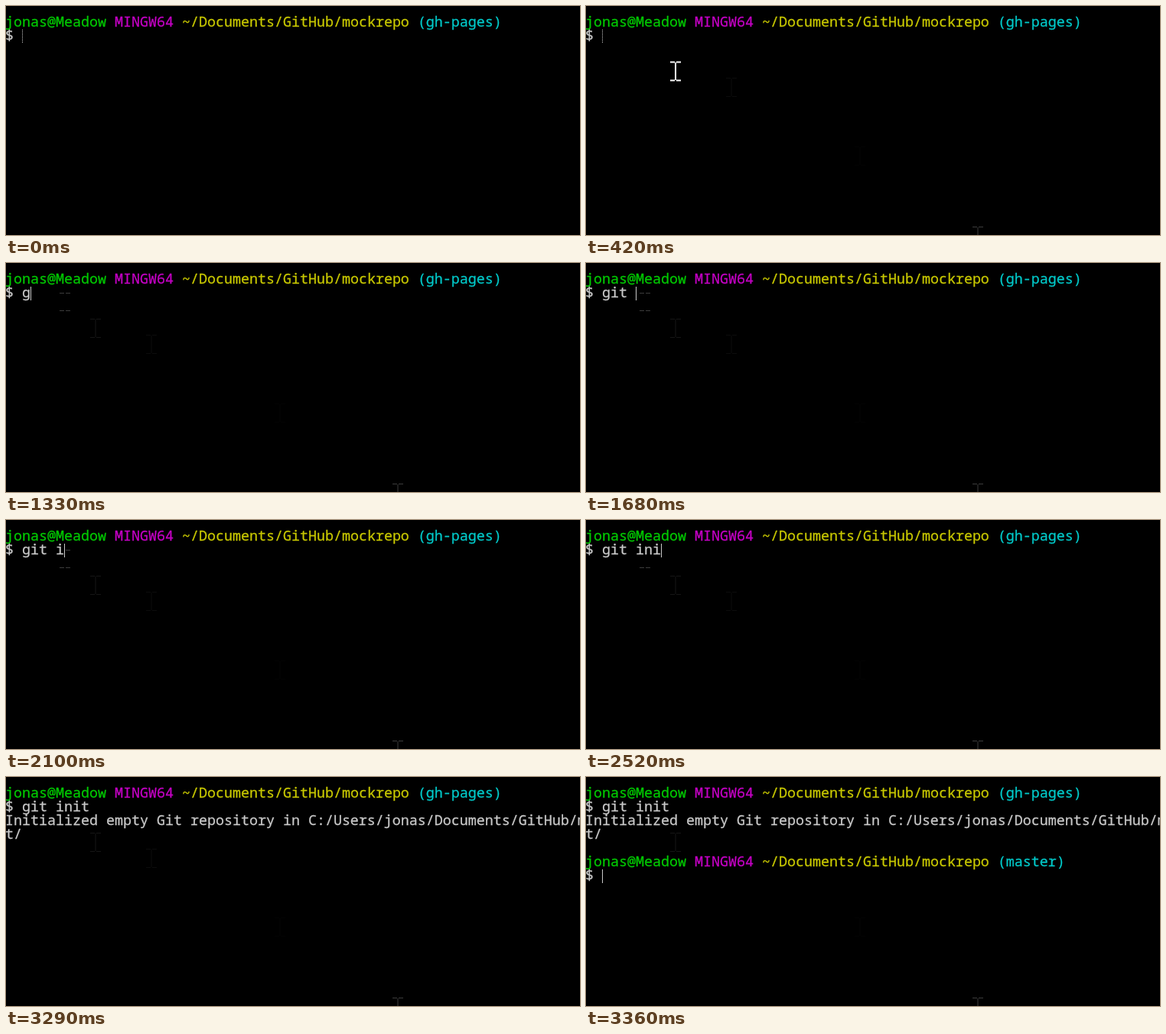
These frames come from a looping animation (750x300 px, 3.71 s). An HTML page:

```html
<!DOCTYPE html>
<html lang="en">
<head>
<meta charset="utf-8">
<title>git init in a terminal</title>
<style>
  html, body { margin: 0; width: 100%; height: 100%; overflow: hidden; background: #000; }
  svg { display: block; width: 750px; height: 300px; }
  text {
    font: 18.333px "Noto Sans Mono", "DejaVu Sans Mono", monospace;
    color: #c8c8c8; fill: currentColor; stroke: currentColor; stroke-width: .3px; white-space: pre;
  }
  tspan { fill: currentColor; stroke: currentColor; }
  .user { color: #00c800; }
  .sys { color: #c400c4; }
  .path { color: #c8c800; }
  .branch { color: #00c8c8; }
  #caret { stroke: #c8c8c8; }
</style>
</head>
<body>
<svg viewBox="0 0 750 300">
  <defs>
    <path id="beam" d="M-7 -11.5h6m2 0h6M-7 12.5h6m2 0h6M0 -11v23" fill="none"/>
  </defs>
  <g id="ghosts"></g>
  <path id="restTop" d="M70 39.5h6m2 0h6" stroke="#3c3c3c"/>
  <path id="restBottom" d="M70 62.5h6m2 0h6" stroke="#3c3c3c"/>
  <rect id="cleared" x="21" y="31" height="18"/>
  <g id="lines"></g>
  <path id="caret"/>
  <use id="mouse" href="#beam" stroke="#fff" stroke-width="2"/>
</svg>
<script>
const LOOP = 3710, CELL = 11, ROW = 18;
const $ = id => document.getElementById(id);
const show = (el, on) => el.setAttribute("visibility", on ? "visible" : "hidden");
const add = (parent, markup) => {
  parent.insertAdjacentHTML("beforeend", markup);
  return parent.lastElementChild;
};

const prompt = branch => `<tspan class="user">jonas@Meadow</tspan> <tspan class="sys">MINGW64</tspan> ` +
  `<tspan class="path">~/Documents/GitHub/mockrepo</tspan> <tspan class="branch">(${branch})</tspan>`;
const line = (row, content) => add($("lines"), `<text x="-1" y="${27 + row * ROW}">${content}</text>`);
const ghost = (x, y, color, from, to = LOOP) => ({
  el: add($("ghosts"), `<use href="#beam" x="${x}" y="${y}" stroke="${color}"/>`), from, to
});

line(0, prompt("gh-pages"));
const command = line(1, "$ ");
const timed = [
  { el: line(2, "Initialized empty Git repository in C:/Users/jonas/Documents/GitHub/mockrepo/.gi"), from: 3290, to: LOOP },
  { el: line(3, "t/"), from: 3290, to: LOOP },
  { el: line(5, prompt("master")), from: 3360, to: LOOP },
  { el: line(6, "$ "), from: 3360, to: LOOP },
  ghost(512, 301, "#3c3c3c", 210),
  ghost(358, 196, "#040404", 350),
  ghost(190, 106, "#0c0c0c", 420, 3360),
  ghost(117, 85, "#161616", 490),
  { el: $("restTop"), from: 1330, to: 3290 },
  { el: $("restBottom"), from: 1330, to: 3290 },
  { el: $("mouse"), from: 140, to: 1330 }
];

const typed = "git init";
const keyTimes = [1330, 1470, 1610, 1680, 2100, 2310, 2520, 2800];
// Pointer positions, one per 70 ms tick from 140 ms
const track = [[512, 301], [440, 251], [358, 196], [190, 106], [117, 85], [94, 64], [81, 53], [77, 50]];

function draw(t) {
  for (const { el, from, to } of timed) show(el, t >= from && t < to);

  const count = keyTimes.filter(k => t >= k).length;
  command.textContent = "$ " + typed.slice(0, count);
  $("cleared").setAttribute("width", count ? count * CELL + 1 : 0);

  const tick = Math.floor((t - 140) / 70);
  const [mx, my] = track[Math.max(0, Math.min(tick, track.length - 1))];
  $("mouse").setAttribute("transform", `translate(${mx} ${my})`);

  const done = t >= 3360;
  const x = 21.5 + (done ? 0 : count * CELL);
  $("caret").setAttribute("d", `M${x} ${done ? 121 : 31}v18`);
  $("caret").setAttribute("stroke-dasharray", t < 700 ? "1 1" : "none");
  show($("caret"), t < 3080 || done);
}

const start = performance.now();
function frame() {
  draw((performance.now() - start) % LOOP);
  requestAnimationFrame(frame);
}
frame();
</script>
</body>
</html>
```
